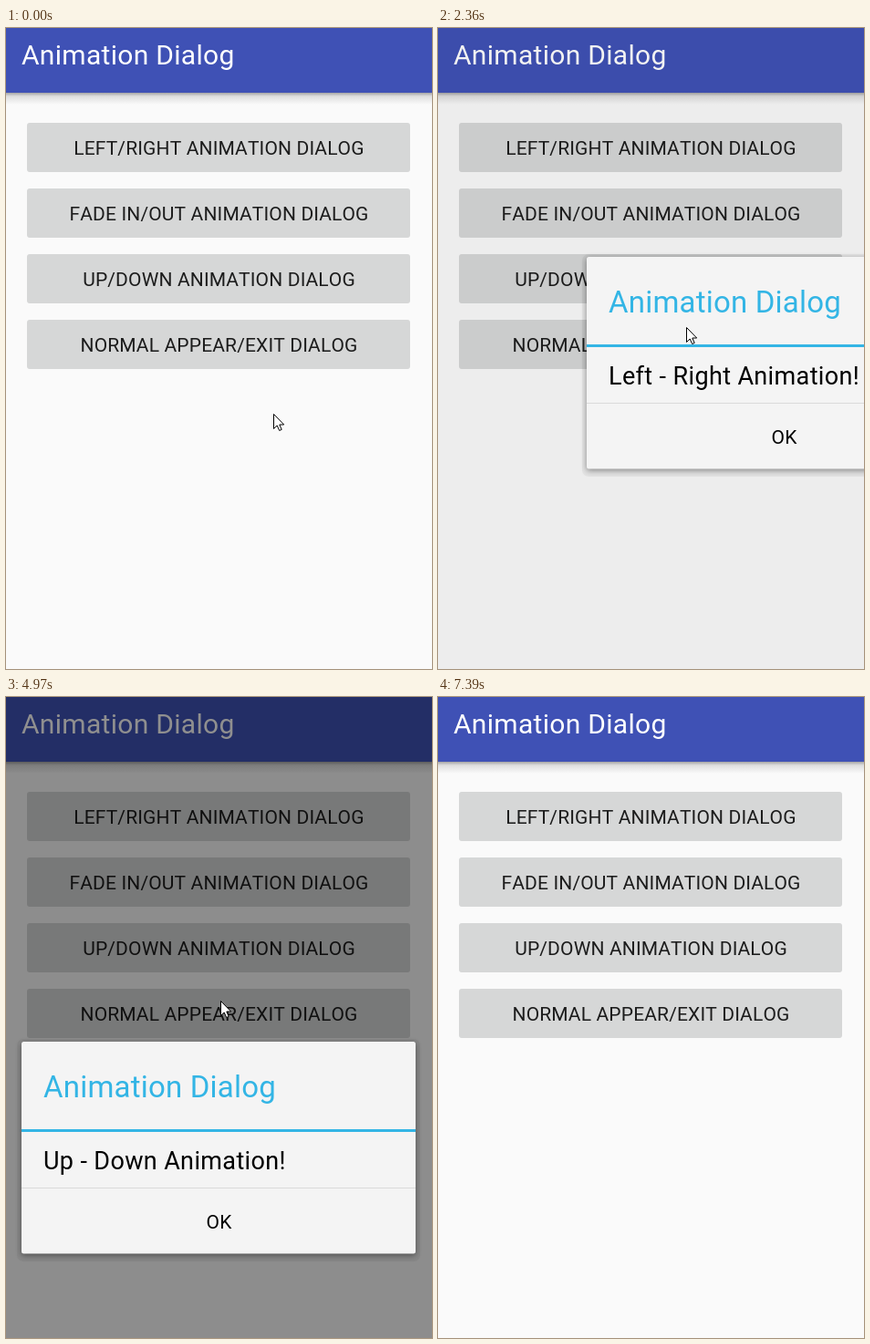
These frames come from a looping animation (467x703 px, 7660 ms). An HTML page:

```html
<!DOCTYPE html>
<html lang="en">
<head>
<meta charset="utf-8">
<title>Animation Dialog</title>
<style>
  html, body { margin: 0; width: 100%; height: 100%; overflow: hidden; background: #fafafa; }
  svg { display: block; width: 467px; height: 703px; }
  text { font-family: Roboto, sans-serif; font-kerning: none; white-space: pre; }
  .caps { font-size: 21px; letter-spacing: .15px; text-anchor: middle; fill: #1c1c1c; }
  .card { fill: #f4f4f4; filter: drop-shadow(0 2px 3px rgba(0, 0, 0, .4)); }
</style>
</head>
<body>
<svg viewBox="0 0 467 703">
  <defs>
    <linearGradient id="shade" x2="0" y2="1">
      <stop offset="0" stop-color="#000" stop-opacity=".34"/>
      <stop offset=".3" stop-color="#000" stop-opacity=".11"/>
      <stop offset="1" stop-color="#000" stop-opacity="0"/>
    </linearGradient>
  </defs>
  <rect width="467" height="703" fill="#fafafa"/>
  <rect y="71" width="467" height="13" fill="url(#shade)"/>
  <rect width="467" height="71" fill="#3f51b5"/>
  <text x="17" y="40" font-size="30" letter-spacing=".3" fill="#fff">Animation Dialog</text>
  <g id="buttons"></g>
  <rect id="dim" width="467" height="703"/>
  <g id="dialog">
    <rect x="12" y="248" width="442" height="244" rx="7" fill-opacity=".045"/>
    <rect class="card" x="17" y="251" width="432" height="232.5" rx="2.5"/>
    <text x="41" y="312" font-size="33" letter-spacing=".2" fill="#33b5e5">Animation Dialog</text>
    <rect x="17" y="347" width="432" height="3" fill="#33b5e5"/>
    <text id="message" x="41" y="391" font-size="27" letter-spacing=".36"></text>
    <rect x="17" y="411" width="432" height="1" fill="#dadada"/>
    <text class="caps" x="233.5" y="456" style="fill:#000">OK</text>
  </g>
  <path id="cursor" d="M.5.5V16.5L4.2 13L6.7 18.5L9.2 17.4L6.8 12H11.7Z" fill="#fff" stroke="#000"/>
</svg>
<script>
const LOOP = 7660;
const $ = id => document.getElementById(id);

const labels = ['LEFT/RIGHT ANIMATION DIALOG', 'FADE IN/OUT ANIMATION DIALOG',
  'UP/DOWN ANIMATION DIALOG', 'NORMAL APPEAR/EXIT DIALOG'];
$('buttons').innerHTML = labels.map((label, i) => {
  const y = 104 + i * 72;
  return `<rect x="23" y="${y}" width="420" height="54" rx="3" fill="#d6d7d7"/>
    <text class="caps" x="233.5" y="${y + 35}">${label}</text>`;
}).join('');

// Screen refreshes: [first, last, count]
const ticks = [[0, 0, 1], [120, 1100, 8], [1250, 2210, 8], [2360, 3170, 7], [3290, 3290, 1],
  [3440, 4150, 6], [4270, 4420, 2], [4540, 5550, 8], [5670, 6050, 4], [6330, 7260, 8], [7390, 7390, 1]]
  .flatMap(([a, b, n]) => Array.from({ length: n },
    (_, i) => n > 1 ? Math.round((a + (b - a) * i / (n - 1)) / 10) * 10 : a));

// Pointer tip: [time, x, y]
const path = [[0, 293, 423], [130, 291, 405], [820, 262, 132], [1390, 262, 132], [1920, 290, 446],
  [2150, 290, 446], [2360, 272, 328], [2760, 237, 208], [3290, 237, 208], [3720, 243, 446],
  [3930, 243, 446], [4150, 241, 338], [4420, 236, 278], [4830, 236, 278], [5260, 234, 446],
  [5550, 234, 446], [5670, 234, 433], [5930, 234, 352], [6330, 234, 352], [6730, 240, 446],
  [7000, 240, 446], [7260, 417, 698], [7390, 480, 790]];

// Each dialog: opening and closing time, their durations, and its look when k = 1 (gone) to 0 (open)
const dialogs = [
  { text: 'Left - Right Animation!', open: 1068, close: 2122, inMs: 334, outMs: 426, look: k => ({ x: 467 * k }) },
  { text: 'Fade In - Fade Out Animation!', open: 3092, close: 3893, inMs: 254, outMs: 371, look: k => ({ alpha: 1 - k }) },
  { text: 'Up - Down Animation!', open: 4780, close: 5497, inMs: 330, outMs: 319, look: k => ({ y: 703 * k }) },
  { text: 'Normal Animation!', open: 6270, close: 6930, inMs: 200, outMs: 200, look: k => ({ alpha: 1 - k, scale: 1 - .1 * k }) }
];
const DIM = .6, DIM_MS = 260;

const clamp = v => Math.min(1, Math.max(0, v));

function pointer(t) {
  const i = path.findIndex(p => p[0] > t);
  if (i < 0) return path[path.length - 1].slice(1);
  const [t0, x0, y0] = path[i - 1], [t1, x1, y1] = path[i];
  const k = (t - t0) / (t1 - t0);
  return [Math.round(x0 + (x1 - x0) * k), Math.round(y0 + (y1 - y0) * k)];
}

function draw(t) {
  const d = dialogs.find(d => t >= d.open && t < d.close + d.outMs);
  $('dialog').style.display = d ? '' : 'none';
  let dim = 0;
  if (d) {
    const k = t < d.close ? (1 - clamp((t - d.open) / d.inMs)) ** 2 : clamp((t - d.close) / d.outMs) ** 2;
    const { x = 0, y = 0, alpha = 1, scale = 1 } = d.look(k);
    dim = DIM * (clamp((t - d.open) / DIM_MS) - clamp((t - d.close) / DIM_MS));
    $('message').textContent = d.text;
    $('dialog').setAttribute('opacity', alpha);
    $('dialog').setAttribute('transform',
      `translate(${Math.round(x) + 233 * (1 - scale)} ${Math.round(y) + 367 * (1 - scale)}) scale(${scale})`);
  }
  $('dim').setAttribute('opacity', dim);
  $('cursor').setAttribute('transform', `translate(${pointer(t)})`);
}

const start = performance.now();
function frame() {
  const t = (performance.now() - start) % LOOP;
  draw(ticks.filter(s => s <= t).pop() ?? 0);
  requestAnimationFrame(frame);
}
frame();
</script>
</body>
</html>
```
